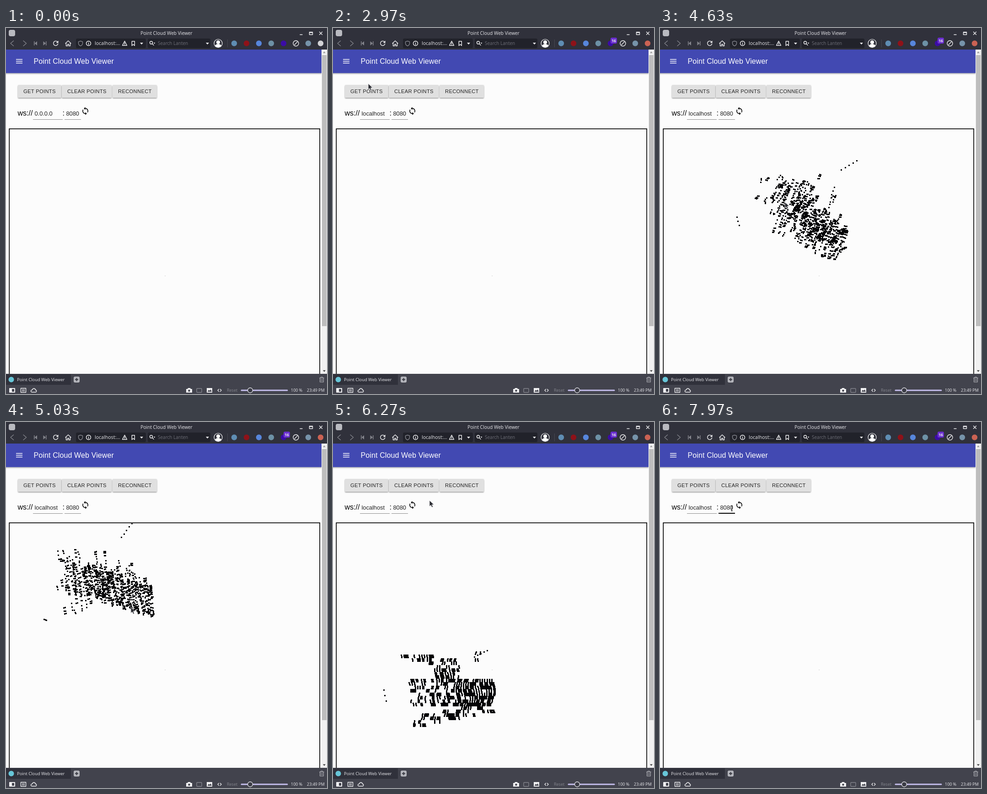
An HTML page with a canvas for the animation above (8 s loop, 702x798 px).

```html
<!DOCTYPE html>
<html lang="en">
<head>
<meta charset="utf-8">
<title>Point Cloud Web Viewer</title>
<style>
  html, body { margin: 0; width: 702px; height: 798px; overflow: hidden; background: #fcfcfc; }
  svg, canvas { position: absolute; left: 0; top: 0; }
  canvas { left: 8px; top: 221px; }
  text { white-space: pre; }
  .ui { font-family: "Open Sans", "Noto Sans", sans-serif; fill: #e8e8ec; }
  .page { font-family: "Liberation Sans", Arial, sans-serif; }
  .btn { font-size: 11.2px; letter-spacing: .32px; fill: #222; }
  .field { font-size: 12.8px; fill: #222; }
  .line { fill: none; stroke: #f0f0f2; stroke-width: 1.4; stroke-linecap: round; stroke-linejoin: round; }
  .dim { stroke: #83848c; }
</style>
</head>
<body>
<svg width="702" height="798" viewBox="0 0 702 798">
  <defs>
    <filter id="shadow" x="-20%" y="-40%" width="140%" height="200%">
      <feDropShadow dx="0" dy="1.5" stdDeviation="1" flood-opacity=".4"/>
    </filter>
    <filter id="lift" x="-20%" y="-40%" width="140%" height="200%">
      <feDropShadow dx="0" dy="2.2" stdDeviation="2.2" flood-opacity=".5"/>
    </filter>
    <clipPath id="view"><rect y="47" width="702" height="707"/></clipPath>
  </defs>

  <rect width="702" height="798" fill="#fcfcfc"/>
  <g id="app" class="page" clip-path="url(#view)">
    <rect x="-8" y="40" width="698" height="58.2" fill="#434ab2" filter="url(#shadow)"/>
    <path d="M22 68.500h14M22 72.500h14M22 76.500h14" stroke="#fff" stroke-width="1.600"/>
    <text x="60.500" y="78" font-size="16" letter-spacing=".12" fill="#fff">Point Cloud Web Viewer</text>
    <g id="buttons"></g>
    <text x="25.500" y="190.500" font-size="16">ws://</text>
    <text id="host" class="field" x="62.500" y="190.500"></text>
    <text x="123.500" y="190.500" font-size="16">:</text>
    <text class="field" x="131.500" y="190.500">8080</text>
    <path d="M59 199.500h65M128 199.500h36" stroke="#8c8c8c"/>
    <path id="focus" d="M128 199h36" stroke="#000" stroke-width="2"/>
    <path transform="translate(163.900 171.400) scale(.8)" d="M12 4V1L8 5l4 4V6c3.300 0 6 2.700 6 6 0 1-.25 2-.7 2.800l1.460 1.460C19.500 15 20 13.600 20 12c0-4.400-3.600-8-8-8zm0 14c-3.300 0-6-2.700-6-6 0-1 .25-2 .7-2.800L5.240 7.740C4.500 9 4 10.400 4 12c0 4.400 3.600 8 8 8v3l4-4-4-4z"/>
    <rect x="7.200" y="219.800" width="679" height="560" fill="none" stroke="#000" stroke-width="1.700"/>
    <rect x="347" y="540" width="2" height="1" fill="#ccc"/>
    <rect x="690" y="47" width="12" height="707" fill="#f1f1f1"/>
    <rect x="691" y="59" width="10" height="591" fill="#bdbdbd"/>
    <path d="M693 55l3-4 3 4z" fill="#a0a0a0"/>
    <path d="M693 746l3 4 3-4z" fill="#505050"/>
  </g>

  <!-- browser top -->
  <rect width="702" height="47" fill="#30313b"/>
  <rect x="6" y="4" width="14" height="14" rx="4" fill="#b9bac0"/>
  <text class="ui" x="351" y="15" font-size="10.200" text-anchor="middle">Point Cloud Web Viewer</text>
  <path class="line" d="M643 14.500h5M663.500 9h7v5.500h-7zM663.500 10h7M685.500 8.500l6 6m0-6l-6 6"/>
  <path class="line dim" d="M16.500 28l-6.500 5.500 6.500 5.500M38 28l6.500 5.500-6.500 5.500"/>
  <path d="M61 29h1.500v9H61zM68 29v9l-5.500-4.500zM87 29h1.500v9H87zM81.500 29v9l5.500-4.500z" fill="#83848c"/>
  <rect id="hover" x="97" y="22" width="25" height="23" rx="2" fill="#23242c"/>
  <g id="reload">
    <path class="line" d="M112.600 30.200a5 5 0 1 0 1 4.300"/>
    <path d="M114.500 27.500v5h-5z" fill="#f0f0f2"/>
  </g>
  <path id="stop" class="line" d="M105 29.500l8.500 8.500m0-8.500l-8.500 8.500"/>
  <path class="line" d="M130 33.500l6-5.500 6 5.500M131.500 33v6h3.200v-3.500h2.600V39h3.200v-6"/>
  <rect id="urlField" x="153" y="23" height="21" rx="3" fill="#21222a"/>
  <path class="line dim" d="M163 28.500l4.500 1.300v4q-.5 3.500-4.500 5.200-4-1.700-4.500-5.200v-4z"/>
  <circle class="line" cx="180.500" cy="33.500" r="5"/>
  <path class="line" d="M180.500 33v3.200M180.500 30.700v.1M259.500 28.500l5 9.500h-10zM259.500 32v2.600M259.500 36.200v.1"/>
  <text class="ui" x="194" y="37.300" font-size="10.600">localhost:...</text>
  <g id="progress" class="ui" font-size="8.500" font-weight="600">
    <text x="275" y="36.500">2 KB</text><text x="322" y="36.500">0/1</text>
  </g>
  <g id="tools">
    <path class="line" d="M275.300 29h6v9.500l-3-2.700-3 2.700z"/>
    <rect x="310" y="23" width="137" height="21" rx="3" fill="#21222a"/>
    <path d="M293 32h7l-3.500 4zM437 32h7l-3.500 4zM322.500 32h4l-2 2.500z" fill="#f0f0f2"/>
    <circle class="line" cx="317.500" cy="32" r="3"/>
    <path class="line" d="M320 34.500l3 3"/>
    <text class="ui" x="332" y="37" font-size="10" style="fill:#6e6f78">Search Lanten</text>
    <circle cx="464" cy="33.500" r="9" fill="#30313b" stroke="#fff" stroke-width="1.200"/>
    <circle cx="464" cy="31" r="4" fill="#fff"/>
    <path d="M457 39q1-4 7-4t7 4q-3 3.200-7 3.200t-7-3.200z" fill="#fff"/>
    <path d="M484.500 25v17" stroke="#484953"/>
    <g id="extensions"></g>
    <circle class="line" cx="634" cy="33.500" r="6"/>
    <path class="line" d="M631 36.500l6-6"/>
    <g id="badge"><rect x="607" y="21" width="14" height="13" rx="3" fill="#6b2fd0"/>
      <text class="ui" x="614" y="30.800" font-size="8.500" font-weight="700" text-anchor="middle">16</text></g>
  </g>

  <!-- browser bottom -->
  <rect y="754" width="702" height="44" fill="#42434d"/>
  <rect y="755" width="142" height="23" fill="#30313b"/>
  <circle cx="11.500" cy="766.500" r="6" fill="#67c6d8"/>
  <text class="ui" x="24" y="770" font-size="9.400">Point Cloud Web Viewer</text>
  <rect x="148" y="760" width="13" height="13" rx="3" fill="#b5b6bc"/>
  <path d="M154.500 763v7M151 766.500h7" stroke="#33343d" stroke-width="1.800"/>
  <path class="line" style="stroke:#b5b6bc;stroke-width:1" d="M685.500 763h10M688.500 763v-2h4v2M686.500 763v9h8v-9M689 765.500v4.500M692 765.500v4.500"/>
  <rect x="7" y="785" width="13" height="10" rx="1" fill="#f0f0f2"/>
  <rect x="13" y="787" width="5" height="6" fill="#42434d"/>
  <path class="line" d="M32.500 785.500h11v9h-11zM36.500 788v4M39.500 788v4"/>
  <path class="line" d="M57 794q-3-.5-2.500-3 .5-2 3-2 1-3.500 4-3 2.500.3 2.700 3 2.500.3 2.500 2.700-.2 2.300-2.500 2.300z"/>
  <path d="M394 787h3l1-2h5l1 2h3v8h-13zM439 785h12v10h-12z" fill="#f0f0f2"/>
  <circle cx="400.500" cy="790.800" r="2.200" fill="#42434d"/>
  <path d="M440.500 793l3-4 2 2 2-3 2.500 5z" fill="#42434d"/>
  <rect class="line dim" x="417" y="786" width="11" height="8.500" rx="1"/>
  <path class="line" d="M465.500 787.500l-2.500 2.500 2.500 2.500M468.500 787.500l2.500 2.500-2.500 2.500"/>
  <g class="ui" font-size="9">
    <text x="483" y="793.300" style="fill:#85868e">Reset</text>
    <text x="623" y="793.300">100 %</text><text x="658" y="793.300">23:49 PM</text>
  </g>
  <path d="M515 790h100" stroke="#c4bdec" stroke-width="3" stroke-linecap="round"/>
  <circle cx="534" cy="790" r="5.500" fill="#3a3b45" stroke="#e5e5ea" stroke-width="1.300"/>
</svg>

<canvas id="scene" width="678" height="533"></canvas>

<svg width="702" height="798" viewBox="0 0 702 798">
  <path id="arrow" d="M0 0v13l3-2.700 2.300 4.700 2.300-1.100-2.200-4.600 4.100-.3z" fill="#2b2c33" stroke="#eee" stroke-width=".9"/>
  <path id="beam" d="M-2-6q2 0 2 2v8q0 2-2 2M2-6q-2 0-2 2M0 4q0 2 2 2" fill="none" stroke="#222" stroke-width="1.200"/>
</svg>

<script>
const LOOP = 8000, LOAD = [1050, 2250], POINTS = [3420, 6720], PORT_FOCUS = 7780;
const CENTER = { x: 348, y: 540 };
const $ = id => document.getElementById(id);
const show = (id, on) => { $(id).style.display = on ? '' : 'none'; };
const within = (t, [from, to]) => t >= from && t < to;
const clamp = v => Math.max(0, Math.min(1, v));

const buttons = [
  { label: 'GET POINTS', x: 26, w: 95, active: [3080, 4200] },
  { label: 'CLEAR POINTS', x: 122, w: 109, active: [6480, 7020] },
  { label: 'RECONNECT', x: 233, w: 97, active: [0, 0] }
];
$('buttons').innerHTML = buttons.map(b =>
  `<rect x="${b.x}" y="124" width="${b.w}" height="28" rx="2"/>
   <text class="btn" x="${b.x + 12}" y="142">${b.label}</text>`).join('');
const faces = $('buttons').querySelectorAll('rect');

$('extensions').innerHTML =
  ['#5f8db3', '#8e1219', '#5786dc', '#6d91a6', '#3b0ca6', 'none', '#7693aa', '#d3d3d6'].map((color, i) =>
    `<circle cx="${499 + i * 27}" cy="33.500" r="6.200" fill="${color}"/>`).join('');
const devIcon = $('extensions').lastElementChild;

// Each move is [start, duration, a, b].
const pointerMoves = [
  [400, 480, 112, 34], [2450, 670, 72, 134], [3500, 550, 273, 365], [4180, 1350, 273, 421],
  [5530, 740, 211, 171], [6270, 230, 180, 136], [6800, 450, 82, 187], [7500, 280, 157, 188]
];
// Azimuth and elevation in degrees.
const cameraMoves = [[4180, 850, -11, 82], [5030, 500, -4, 11], [5530, 450, 0, 0]];

function follow([a, b], moves, t) {
  for (const [start, duration, toA, toB] of moves) {
    const p = clamp((t - start) / duration), eased = p * p * (3 - 2 * p);
    a += (toA - a) * eased;
    b += (toB - b) * eased;
  }
  return [a, b];
}

let seed = 7;
function random() {
  seed = (seed + 0x6D2B79F5) | 0;
  let r = Math.imul(seed ^ seed >>> 15, 1 | seed);
  r ^= r + Math.imul(r ^ r >>> 7, 61 | r);
  return ((r ^ r >>> 14) >>> 0) / 4294967296;
}

// The scanned room, seen from the side: shelf, column, wall and sloping floor.
const isShelf = (x, y) => x < 216 && y > 507 && y < 512 + (x - 147) * .2;
const isTuft = (x, y) => x > 303 && x < 326 && y < 522;
function density(x, y) {
  const floor = 664 - (x - 178) * .2;
  if (isShelf(x, y)) return .7;
  if (isTuft(x, y)) return .25;
  if (y > 511 && y < 557 && Math.abs(x - 255 + (y - 511) * .2) < 26) return .72;
  if (x > 167 && y > 554 && y < 614) return .45 + .5 * clamp((x - 190) / 120);
  if (x > 177 && y < floor && y > floor - 25) return .55;
  return 0;
}

const cloud = [];
const add = (x, y, depth) => cloud.push([x - CENTER.x, y - CENTER.y, depth]);

for (let x = 147; x < 350; x += 5.2) {
  const phase = random() * 6.3, wall = 255 - (x - 170) * .53;
  for (let y = 501; y < 664; y += 7.5) {
    if (random() > density(x, y)) continue;
    const base = isShelf(x, y) ? 187 : isTuft(x, y) ? 235 : wall;
    const far = random() ** 5 * 45;
    const width = random() < .45 ? 2 : 1;
    for (let s = 0; s < 7.5; s += 2.5) {
      const depth = base + far + 32 * Math.sin((y + s) / 8 + phase);
      const bend = Math.sin((y + s) / 9 + x / 30) * 2.4;
      for (let c = 0; c < width; c++) add(x + c * 2.6 + bend, y + s, depth);
    }
  }
}
for (let i = 0; i < 3; i++) add(111 + i * 2.5, 584 + i * 12, 165);
for (let i = 0; i < 5; i++) add(309 + i * 7, 512 - i * 3.5, 300 + i * 6);

const ctx = $('scene').getContext('2d');
function drawCloud(t) {
  ctx.clearRect(0, 0, 678, 533);
  if (!within(t, POINTS)) return;
  const [azimuth, elevation] = follow([50, 0], cameraMoves, t).map(a => a * Math.PI / 180);
  const ca = Math.cos(azimuth), sa = Math.sin(azimuth);
  const ce = Math.cos(elevation), se = Math.sin(elevation);
  ctx.fillStyle = '#040406';
  for (const [u, v, d] of cloud) {
    const x = CENTER.x + u * ca + d * sa;
    const y = CENTER.y + v * ce - (d * ca - u * sa) * se;
    ctx.fillRect(Math.round(x - 9.5), Math.round(y - 222.5), 3, 3);
  }
}

function drawPointer(t) {
  const [x, y] = follow([0, 225], pointerMoves, t);
  const overField = y > 177 && y < 201 && (x > 59 && x < 124 || x > 128 && x < 164);
  show('arrow', t > 400 && !overField);
  show('beam', t > 400 && overField);
  for (const id of ['arrow', 'beam']) $(id).setAttribute('transform', `translate(${x} ${y})`);
}

function frame() {
  const t = performance.now() % LOOP;
  const loading = within(t, LOAD), loaded = t >= LOAD[1];
  show('app', !loading);
  show('reload', !loading);
  show('stop', loading);
  show('progress', loading);
  show('hover', within(t, [850, 2520]));
  show('badge', loaded);
  show('focus', t >= PORT_FOCUS);
  devIcon.setAttribute('fill', loaded ? '#cb6253' : '#d3d3d6');
  $('urlField').setAttribute('width', loading ? 240 : 153);
  $('tools').setAttribute('transform', `translate(${loading ? 86 : 0})`);
  $('host').textContent = loaded ? 'localhost' : '0.0.0.0';
  buttons.forEach((b, i) => {
    const active = within(t, b.active);
    faces[i].setAttribute('fill', active ? '#d3d3d3' : '#e0e0e0');
    faces[i].setAttribute('filter', `url(#${active ? 'lift' : 'shadow'})`);
  });
  drawCloud(t);
  drawPointer(t);
  requestAnimationFrame(frame);
}
frame();
</script>
</body>
</html>
```
